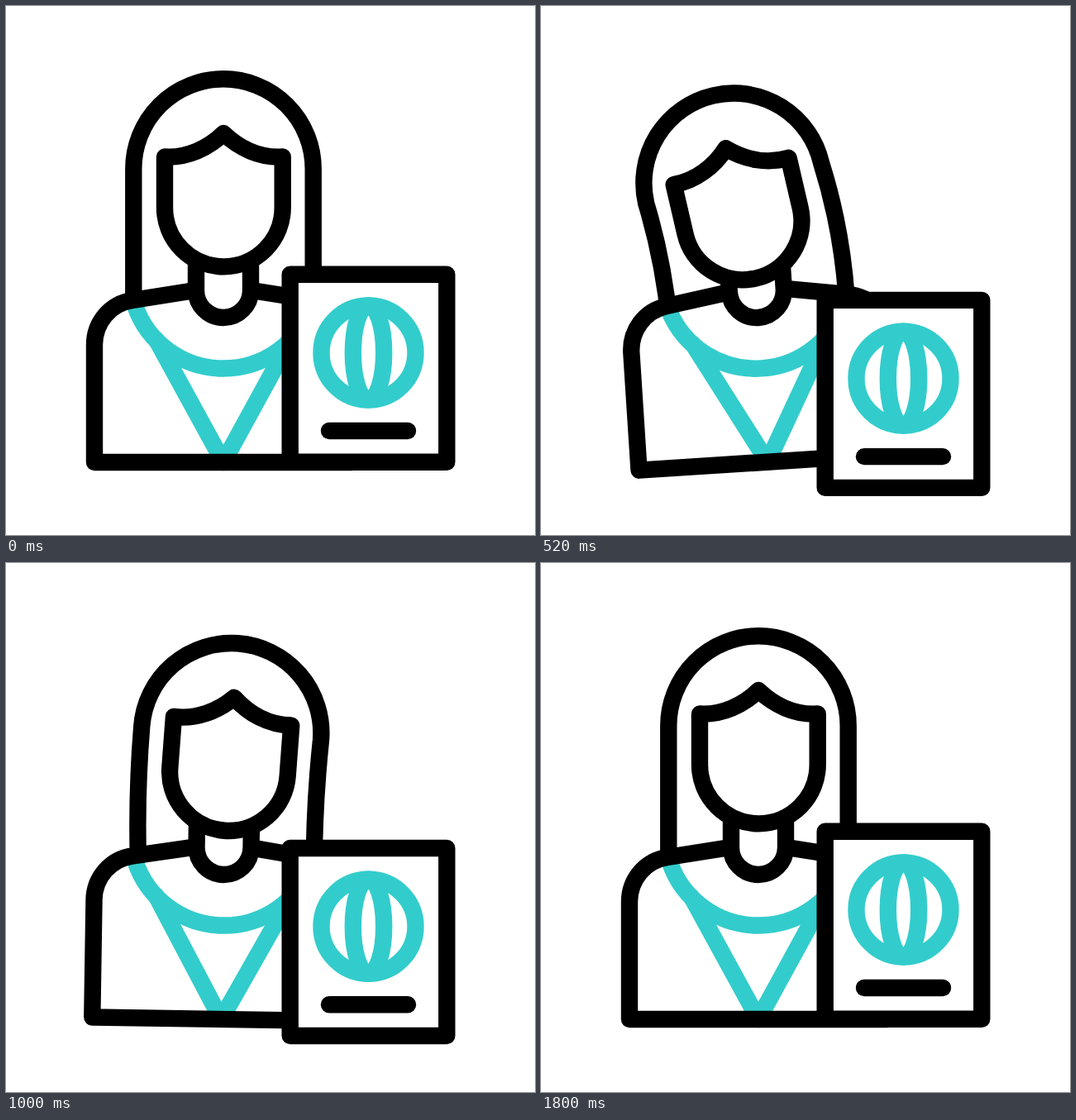
An HTML page without scripts for the animation above (1.96 s loop, 640x640 px).

```html
<!DOCTYPE html>
<html lang="en">
<head>
<meta charset="utf-8">
<title>Woman with passport</title>
<style>
  html, body { margin: 0; width: 100%; height: 100%; overflow: hidden; background: #fff; }
  svg { display: block; width: 100%; height: 100%; }

  .ink, .teal { fill: none; stroke: #000; stroke-width: 20.4; stroke-linejoin: round; }
  .teal { stroke: #33cccc; }
  .solid { fill: #fff; }
  .round { stroke-linecap: round; }

  .lean, .head, .pass, .hair {
    animation: 1960ms cubic-bezier(.37, 0, .63, 1) infinite;
  }
  .lean { transform-origin: 263px 378px; animation-name: lean; }
  .head { transform-origin: 263px 315px; animation-name: nod, bob; }
  .pass { animation-name: dip; }
  .hair { animation-name: sway; }

  @keyframes lean {
    0%, 8.16% { rotate: 0deg; }
    30.6% { rotate: -4deg; }
    59.4% { rotate: 2.05deg; }
    83.2%, 100% { rotate: 0deg; }
  }
  @keyframes nod {
    0%, 4.08% { rotate: 0deg; }
    21.8% { rotate: -11.2deg; }
    43.4% { rotate: 4.4deg; }
    67.3%, 100% { rotate: 0deg; }
  }
  @keyframes bob {
    0%, 6.5% { translate: 0 0; }
    30.6%, 38.3% { translate: 0 15px; }
    65.8%, 100% { translate: 0 0; }
  }
  @keyframes dip {
    0%, 7.4% { translate: 0 0; }
    33.4%, 38% { translate: 0 37px; }
    65.8%, 100% { translate: 0 0; }
  }
  /* the strands trail behind the head */
  @keyframes sway {
    0%, 12.2%, 91.8%, 100% {
      d: path("M154.3 360Q154.3 278 154.3 197A108.7 108.7 0 0 1 371.7 197Q371.7 278 371.7 360");
    }
    26.5% {
      d: path("M149 345Q159 268 154.3 197A108.7 108.7 0 0 1 371.7 197Q378 278 365 360");
    }
    42.9% {
      d: path("M163 360Q154.5 278 154.3 197A108.7 108.7 0 0 1 371.7 197Q370.5 278 377.5 360");
    }
    59.2% {
      d: path("M161.4 360Q153 278 154.3 197A108.7 108.7 0 0 1 371.7 197Q368 278 373.5 360");
    }
    75.5% {
      d: path("M149.3 360Q151.8 278 154.3 197A108.7 108.7 0 0 1 371.7 197Q369.2 278 366.7 360");
    }
  }
</style>
</head>
<body>
<svg viewBox="0 0 640 640">
  <g class="lean">
    <g class="head">
      <path class="ink hair" d="M154.3 360Q154.3 278 154.3 197A108.7 108.7 0 0 1 371.7 197Q371.7 278 371.7 360"/>
    </g>

    <path fill="#fff" d="M226 344.5L153 356C126 360 107 383 107 410V552H419V410C419 383 400 360 373 356L300 344.5Z"/>
    <path class="teal" d="M156 362.3A113.2 113.2 0 0 0 370 362.3"/>
    <path class="teal round" d="M182 404L263 552L344 404"/>
    <path class="ink" d="M226 344.5L153 356C126 360 107 383 107 410V552H419V410C419 383 400 360 373 356L300 344.5"/>
    <path class="ink" d="M230 306V344A33 33 0 0 0 296 344V306"/>

    <g class="head">
      <path class="ink solid" d="M263.2 154C245 172 219 184 192 182.5V244A71.3 71.3 0 0 0 334.7 244V182.5C307 184 282 172 263.2 154Z"/>
    </g>
  </g>

  <g class="pass">
    <rect class="ink solid" x="343.7" y="324.7" width="189.6" height="227"/>
    <circle class="teal" cx="438.5" cy="419.5" r="57"/>
    <ellipse class="teal" cx="438.5" cy="419.5" rx="18.7" ry="57"/>
    <path class="ink round" d="M391 514H486"/>
  </g>
</svg>
</body>
</html>
```
